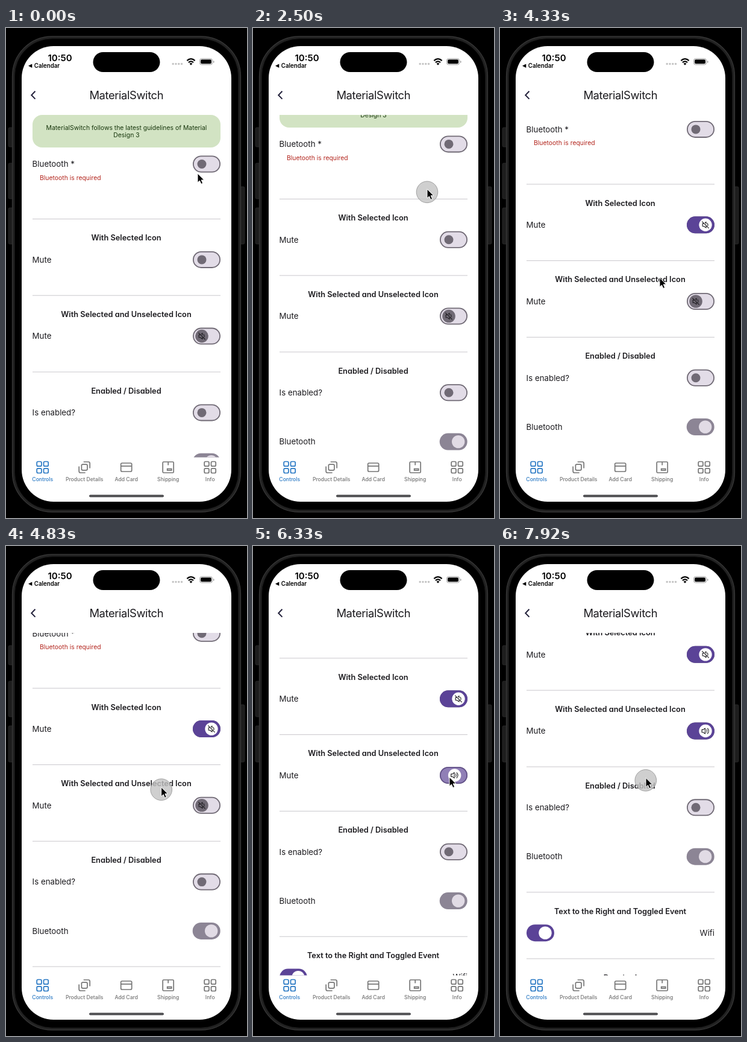
An HTML page for the animation above (8000 ms loop, 400 by 812 pixels).

```html
<!DOCTYPE html>
<html lang="en">
<head>
<meta charset="utf-8">
<title>MaterialSwitch</title>
<style>
html, body { margin: 0; width: 100%; height: 100%; overflow: hidden; background: #000; }
svg { display: block; width: 100%; height: 100%; }
text { font-family: Inter, Roboto, sans-serif; }
.heading { font-weight: 600; font-size: 12.8px; text-anchor: middle; fill: #1c1b1f; font-feature-settings: "cv11"; }
.label { font-size: 13.3px; fill: #1c1b1f; }
.small { font-size: 10.4px; }
.tab { font-size: 8.6px; font-weight: 500; text-anchor: middle; stroke: none; }
.middle { text-anchor: middle; }
</style>
</head>
<body>
<svg id="stage" viewBox="0 0 400 812"></svg>
<script>
const LOOP = 8000;
const PURPLE = '#5b4397', INK = '#1c1b1f', GREY = '#706a75';

const box = (x, y, w, h, r, attrs = '') =>
  `<rect x="${x}" y="${y}" width="${w}" height="${h}" rx="${r}" ${attrs}/>`;
const text = (x, y, str, attrs) => `<text x="${x}" y="${y}" ${attrs}>${str}</text>`;
const label = (y, str) => text(43.6, y + 4.8, str, 'class="label"');

// Icons are drawn on a 24 unit grid centred on 0,0.
const icon = (id, d) =>
  `<path id="${id}" d="${d}" transform="scale(.54)" fill="none" stroke="${INK}"
    stroke-width="2" stroke-linejoin="round" stroke-linecap="round"/>`;
const muted = id => icon(id, 'M-4 -4H-9V4H-5L2 9V2M-1.5 -6.5L2 -9V-3M-10 -10L10 10M6 -5Q8.5 -1 7 3');
const loud = id => icon(id, 'M-11 -4V4H-7L-1 8.5V-8.5L-7 -4ZM3.5 -4Q6.5 0 3.5 4M6.5 -8Q13.5 0 6.5 8');

function toggle(id, y, icons = '') {
  return `<g id="${id}" transform="translate(310 ${y})">
    ${box(0.9, -13.1, 44.2, 26.2, 13.1, `fill="#e2dce7" stroke="${GREY}" stroke-width="1.8"`)}
    <rect class="on" y="-14" width="46" height="28" rx="14" fill="${PURPLE}"/>
    <g class="thumb"><circle/>${icons}</g></g>`;
}
const fixedToggle = (x, y, track, thumb) =>
  box(x, y - 14, 46, 28, 14, `fill="${track}"`) +
  `<circle cx="${x + 31}" cy="${y}" r="10.7" fill="${thumb}"/>`;

// A divider, a heading below it and a row placed under the heading.
const section = (y, title, row = () => '') =>
  `<path d="M44 ${y}H356" stroke="#c9c7cc"/>` +
  text(199.5, y + 35.8, title, 'class="heading"') + row(y + 67.4);

const content = [
  box(44, 144, 312, 54, 16, 'fill="#d2e3c3"'),
  ['MaterialSwitch follows the latest guidelines of Material', 'Design 3'].map((line, i) =>
    text(200, 168.8 + i * 12.5, line, 'class="small middle" fill="#17360c"')).join(''),
  label(225.5, 'Bluetooth *'), toggle('bluetooth', 225.5),
  text(56, 251.6, 'Bluetooth is required', 'class="small" fill="#b3261e"'),
  section(316.5, 'With Selected Icon', y =>
    label(y, 'Mute') + toggle('mute', y, muted('muteOn'))),
  section(443.2, 'With Selected and Unselected Icon', y =>
    label(y, 'Mute') + toggle('sound', y, muted('soundOff') + loud('soundOn'))),
  section(570, 'Enabled / Disabled', y =>
    label(y, 'Is enabled?') + toggle('enabled', y) +
    label(y + 81.3, 'Bluetooth') + fixedToggle(309.7, y + 81.3, '#8c8595', '#e1dbe5')),
  section(777.8, 'Text to the Right and Toggled Event', y =>
    fixedToggle(44, y, PURPLE, '#fff') +
    text(356, y + 4.8, 'Wifi', 'class="label" text-anchor="end"')),
  section(888, 'Required')
].join('');

const squares = [-9.5, 1.8].map(x =>
  [-9.5, 1.8].map(y => box(x, y, 7.7, 7.7, 2)).join('')).join('');
const copies = box(-4.8, -4.8, 9.6, 9.6, 2) +
  '<path d="M-1.5 -9H6.5Q9 -9 9 -6.5V1.5M1.5 9H-6.5Q-9 9 -9 6.5V-1.5"/>';
const card = box(-9, -7, 18, 14, 2) + '<path d="M-9 -2H9"/>';
const parcel = box(-9, -9, 18, 18, 1.5) + '<path d="M0 -9V-3.5"/>' + box(-1.5, 2.5, 7, 2.5, 0);
const tabs = Object.entries({
  'Controls': squares, 'Product Details': copies, 'Add Card': card,
  'Shipping': parcel, 'Info': squares
}).map(([name, art], i) => {
  const color = i ? '#757575' : '#2878c4';
  return `<g transform="translate(${60.7 + i * 69.5} 728)" fill="none" stroke="${color}" stroke-width="1.7">
    ${art}${text(0, 23.4, name, `class="tab" fill="${color}"`)}</g>`;
}).join('');

const button = (x, y, h) => box(x, y, 8, h, 2, 'fill="#1d1d1d" stroke="#2b2b2b" stroke-width=".8"');
const phone = [
  button(4, 165, 32), button(4, 224, 59), button(4, 298, 60), button(388, 263, 95),
  box(10.5, 13.8, 379, 788.4, 66, 'fill="#222" stroke="#393939" stroke-width="1.2"'),
  box(14.5, 17.8, 371, 780.4, 62, 'fill="#000" stroke="#111"'),
  box(26, 30, 348, 755, 53, 'fill="#fff"')
].join('');

const dots = [0, 1, 2, 3].map(i =>
  `<circle cx="${277.2 + i * 4.8}" cy="59.5" r="1.7" fill="#c4c4c4"/>`).join('');
const status = [
  box(144.5, 40, 111, 33, 16.5),
  text(89.5, 54.5, '10:50', 'font-size="15" font-weight="600" class="middle"'),
  '<path d="M37 62.8L43.3 59.5V66.1Z"/>',
  text(46.8, 66.3, 'Calendar', 'font-size="9.7" font-weight="600"'),
  dots,
  '<g fill="none" stroke="#000" stroke-width="2.3"><path d="M300.4 54.2Q307 48 313.6 54.2"/>' +
    '<path d="M303 57.2Q307 53.6 311 57.2"/></g><path d="M304.6 59Q307 57 309.4 59L307 61.7Z"/>',
  box(321.5, 50.8, 21, 10, 3.2, 'fill="none" stroke="#9a9a9a"'),
  box(323, 52.3, 18, 7, 2),
  '<path d="M344 54V58Q345.6 57.4 345.6 56T344 54" fill="#9a9a9a"/>'
].join('');

document.getElementById('stage').innerHTML = `
  <clipPath id="view"><rect x="26" y="144" width="348" height="567.5"/></clipPath>
  ${phone}${status}
  <path d="M48.5 104.8L42.3 111.2L48.5 117.6" fill="none" stroke="#24223c" stroke-width="2"/>
  ${text(199.8, 117.8, 'MaterialSwitch', `font-size="18.4" letter-spacing="-.4" class="middle" fill="${INK}"`)}
  <g clip-path="url(#view)"><g id="list">${content}</g></g>
  ${tabs}
  ${box(138, 773.5, 124, 4, 2, 'fill="#4e4e51"')}
  <circle id="touch" r="17.8" fill="#c4c4c4" fill-opacity=".8" stroke="#989898" stroke-width=".9"/>
  <path id="cursor" d="M0 0V15.2L3.5 12L5.9 17.5L8.6 16.3L6.2 10.9H10.9Z" stroke="#fff"/>`;

// The pointer travels from stop to stop; a drag pulls the list along with it.
const START = { x: 318, y: 241 };
const move = (from, to, x, y) => ({ from, to, x, y });
const drag = (from, to, x, y) => ({ from, to, x, y, held: true });
const route = [
  move(700, 1150, 318, 232),
  move(1960, 2240, 289, 300),
  drag(2300, 2650, 289, 242.4),
  move(2950, 3380, 326, 328),
  move(3620, 4330, 265, 414),
  move(4330, 4640, 258, 423),
  drag(4650, 5220, 257, 350),
  move(5600, 6050, 326, 383),
  move(6380, 7100, 238, 457.8),
  drag(7370, LOOP, 242.6, 373.8)
];
const TAP = 90, LAG = 30;
const taps = { bluetoothOn: 1270, bluetoothOff: 1850, mute: 3470, sound: 6150 };

const clamp = v => Math.min(1, Math.max(0, v));
const smooth = k => k * k * (3 - 2 * k);
const within = (t, from, to) => t >= from && t < to;

function pointer(t) {
  let { x, y } = START, scroll = 0;
  for (const step of route) {
    const k = clamp((t - step.from) / (step.to - step.from));
    const e = step.held ? k : smooth(k);
    const dy = (step.y - y) * e;
    if (step.held) scroll -= dy;
    x += (step.x - x) * e;
    y += dy;
    if (k < 1) break;
  }
  return { x, y, scroll };
}
const touching = t => route.some(s => s.held && within(t, s.from, s.to)) ||
  Object.values(taps).some(at => within(t, at, at + TAP));
const switched = (t, tap) => smooth(clamp((t - tap - TAP) / 160));

const $ = id => document.getElementById(id);
const show = (id, visible) => $(id).setAttribute('opacity', +visible);
const place = (id, x, y) => $(id).setAttribute('transform', `translate(${x} ${y})`);

function setToggle(id, k, offRadius = 7.5) {
  const g = $(id), dot = g.querySelector('circle');
  g.querySelector('.on').setAttribute('opacity', k);
  g.querySelector('.thumb').setAttribute('transform', `translate(${15 + 16 * k} 0)`);
  dot.setAttribute('r', offRadius + (10.7 - offRadius) * k);
  dot.setAttribute('fill', k > 0.4 ? '#fff' : GREY);
}

function draw(t) {
  const now = pointer(t), finger = pointer(t - LAG);
  place('list', 0, -now.scroll);
  place('cursor', now.x, now.y);
  place('touch', finger.x, finger.y);
  show('touch', touching(t));

  const mute = switched(t, taps.mute), sound = switched(t, taps.sound);
  setToggle('bluetooth', switched(t, taps.bluetoothOn) - switched(t, taps.bluetoothOff));
  setToggle('mute', mute);
  setToggle('sound', sound, 10.8);
  setToggle('enabled', 0);
  show('muteOn', mute > 0.4);
  show('soundOff', sound <= 0.4);
  show('soundOn', sound > 0.4);
}

function tick() {
  draw(performance.now() % LOOP);
  requestAnimationFrame(tick);
}
tick();
</script>
</body>
</html>
```
